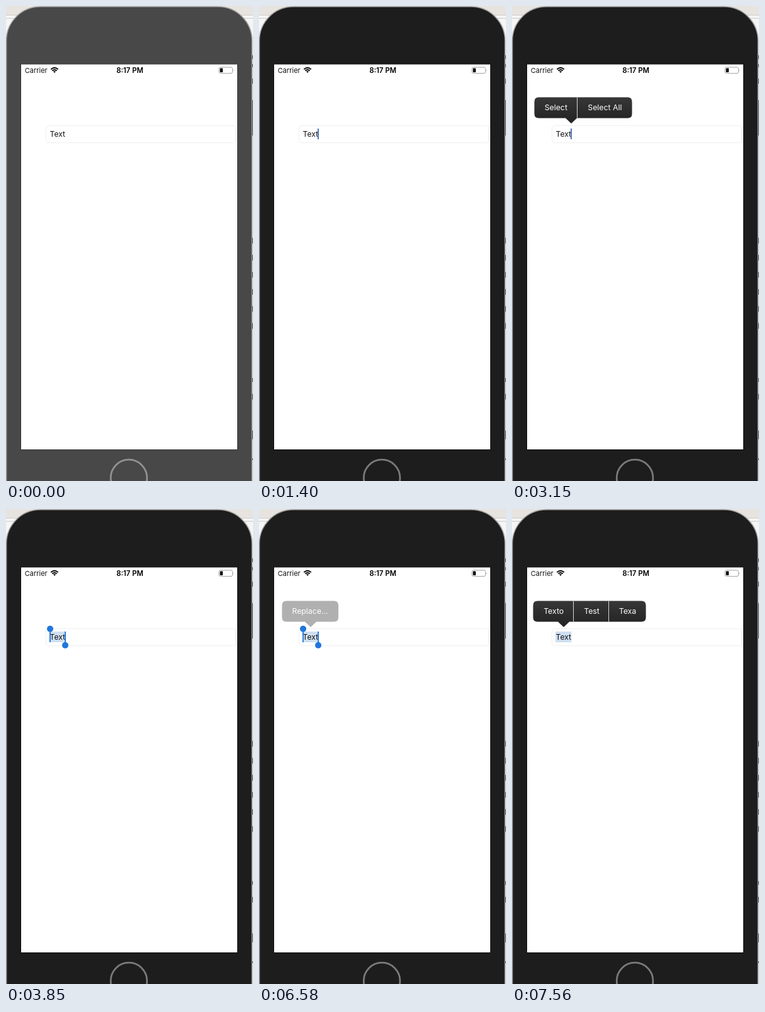
An HTML page that plays this animation: 392x752 px, repeating every 8000 ms.

```html
<!DOCTYPE html>
<html lang="en">
<head>
<meta charset="utf-8">
<title>Text field edit menu</title>
<style>
  html, body { margin: 0; width: 100%; height: 100%; overflow: hidden; background: #f5f5f5; }
  svg { display: block; width: 392px; height: 752px; }
  text { font-family: Inter, "Liberation Sans", sans-serif; font-size: 12px; }
  .menu text { font-size: 12.3px; fill: #fff; text-anchor: middle; }
</style>
</head>
<body>
<svg viewBox="0 0 392 752">
  <defs>
    <linearGradient id="dark" x2="0" y2="1">
      <stop stop-color="#373737"/><stop offset="1" stop-color="#222"/>
    </linearGradient>
  </defs>

  <!-- window behind the phone -->
  <rect width="392" height="14" fill="#e7e3df"/>
  <path d="M0 14.5H392M0 19.5H392" stroke="#d0cdca"/>
  <g id="scraps" fill="#333"></g>

  <!-- phone -->
  <rect id="shell" x=".5" y="1" width="390" height="810" rx="54" stroke="#a4a4a4" stroke-width="1.6"/>
  <rect id="rim" x="23.5" y="92" width="344" height="610.5" fill="none" stroke="#0c0c0c"/>
  <rect x="24" y="92.5" width="343" height="609.5" fill="#fff"/>
  <circle id="home" cx="195" cy="747" r="28.8" fill="none" stroke-width="2.8"/>

  <!-- status bar -->
  <text x="29.7" y="106" style="font-size:11px" fill="#111">Carrier</text>
  <g fill="none" stroke="#000" stroke-width="1.9">
    <path d="M71.3 100.2Q77 95.3 82.7 100.2M73.4 102.5Q77 99.3 80.6 102.5"/>
    <path d="M75 103.6Q77 102.2 79 103.6L77 106Z" fill="#000" stroke="none"/>
  </g>
  <text x="196.6" y="106" text-anchor="middle" style="font-size:11.3px;font-weight:600">8:17 PM</text>
  <rect x="338" y="97" width="21.5" height="9.6" rx="2.4" fill="none" stroke="#a2a2a2"/>
  <rect x="339.6" y="98.6" width="4.4" height="6.4" rx=".8"/>
  <path d="M360.8 100.2Q362.6 101.8 360.8 103.4Z" fill="#999"/>

  <!-- text field -->
  <rect x="63.5" y="189.5" width="301" height="27" rx="4" fill="#fff" stroke="#efefef"/>
  <rect id="selection" x="69" y="194" width="25.5" height="17" fill="#cfdff1"/>
  <text x="69.6" y="207.2" fill="#111">Text</text>
  <rect id="caret" x="93" y="194" width="1.8" height="17" fill="#4568b4"/>
  <g id="handles" fill="#1f76dc">
    <rect x="69" y="190" width="1.8" height="21"/>
    <rect x="93.2" y="194" width="1.8" height="21"/>
    <circle cx="70" cy="189.7" r="5"/>
    <circle cx="94" cy="215.8" r="5"/>
  </g>
  <g id="menus"></g>
</svg>
<script>
const LOOP = 8000, TICK = 70;
const $ = id => document.getElementById(id);
const show = (el, v) => el.setAttribute('opacity', v);

// Edges [x, top, height] of what peeks out beside the phone
$('scraps').innerHTML = [
  [0, 78, 12], [0, 149, 56], [0, 211, 57], [0, 290, 5],
  [390, 78, 6], [390, 92, 5], [390, 115, 8], [389, 149, 56], [390, 589, 6], [390, 614, 9], [390, 672, 14], [390, 716, 3],
  ...[367, 394, 421, 448, 475, 502].map(y => [390, y, 9])
].map(([x, y, h]) => `<rect x="${x}" y="${y}" width="3" height="${h}"/>`).join('');

// items: [label, centre]; splits: divider positions
function addMenu(left, right, top, tip, items, splits = []) {
  const g = document.createElementNS('http://www.w3.org/2000/svg', 'g');
  const low = top + 33;
  g.setAttribute('class', 'menu');
  g.innerHTML =
    `<path class="bubble" fill="url(#dark)" d="M${left + 7} ${top}H${right - 7}q7 0 7 7V${low - 7}q0 7-7 7` +
    `H${tip + 9}L${tip} ${low + 8.5}L${tip - 9} ${low}H${left + 7}q-7 0-7-7V${top + 7}q0-7 7-7Z"/>` +
    '<path class="press" fill="#b0b0b0"/>' +
    splits.map(x => `<path d="M${x} ${top}V${low}" stroke="#d8d8d8"/>`).join('') +
    items.map(([s, x]) => `<text x="${x}" y="${top + 20.8}">${s}</text>`).join('');
  $('menus').append(g);
  return g;
}

const select = addMenu(35.5, 190.5, 144.5, 94, [['Select', 69.8], ['Select All', 147.4]], [103.5]);
const replace = addMenu(36.5, 126, 145.5, 82, [['Replace...', 81]]);
const guesses = addMenu(33.5, 212.5, 145.5, 82, [['Texto', 66.2], ['Test', 126.5], ['Texa', 183.5]], [97.5, 153.5]);
const allPress = select.querySelector('.press');
allPress.setAttribute('d', 'M104 144.5H183.5q7 0 7 7V170.5q0 7-7 7H104Z');
const replaceBubble = replace.querySelector('.bubble');

// Reaches its first visible step at a and is complete at b
const ramp = (t, a, b) => Math.min(1, Math.max(0, (t - a + TICK) / (b - a + TICK)));
const pulse = (t, a, b, c, d) => ramp(t, a, b) - ramp(t, c, d);
const mix = (a, b, k) => { const v = Math.round(a + (b - a) * k); return `rgb(${v},${v},${v})`; };

function draw(now) {
  const t = Math.floor(now % LOOP / TICK) * TICK;
  const active = ramp(t, 1260, 1400);
  $('shell').setAttribute('fill', mix(72, 29, active));
  $('home').setAttribute('stroke', mix(145, 122, active));
  show($('rim'), .35 + .5 * active);

  show($('caret'), pulse(t, 70, 140, 560, 770) + pulse(t, 1120, 1260, 2100, 2240) + pulse(t, 2660, 2730, 3220, 3360));
  show($('selection'), ramp(t, 3780, 3850));
  show($('handles'), pulse(t, 3780, 3850, 7140, 7210));

  show(select, pulse(t, 1820, 1960, 3710, 3850));
  show(allPress, +(t >= 3360));
  show(replace, pulse(t, 4060, 4200, 7140, 7210));
  replaceBubble.setAttribute('fill', t >= 6580 ? '#b0b0b0' : 'url(#dark)');
  show(guesses, ramp(t, 7420, 7560));
}

const start = performance.now();
function frame() {
  draw(performance.now() - start);
  requestAnimationFrame(frame);
}
frame();
</script>
</body>
</html>
```
